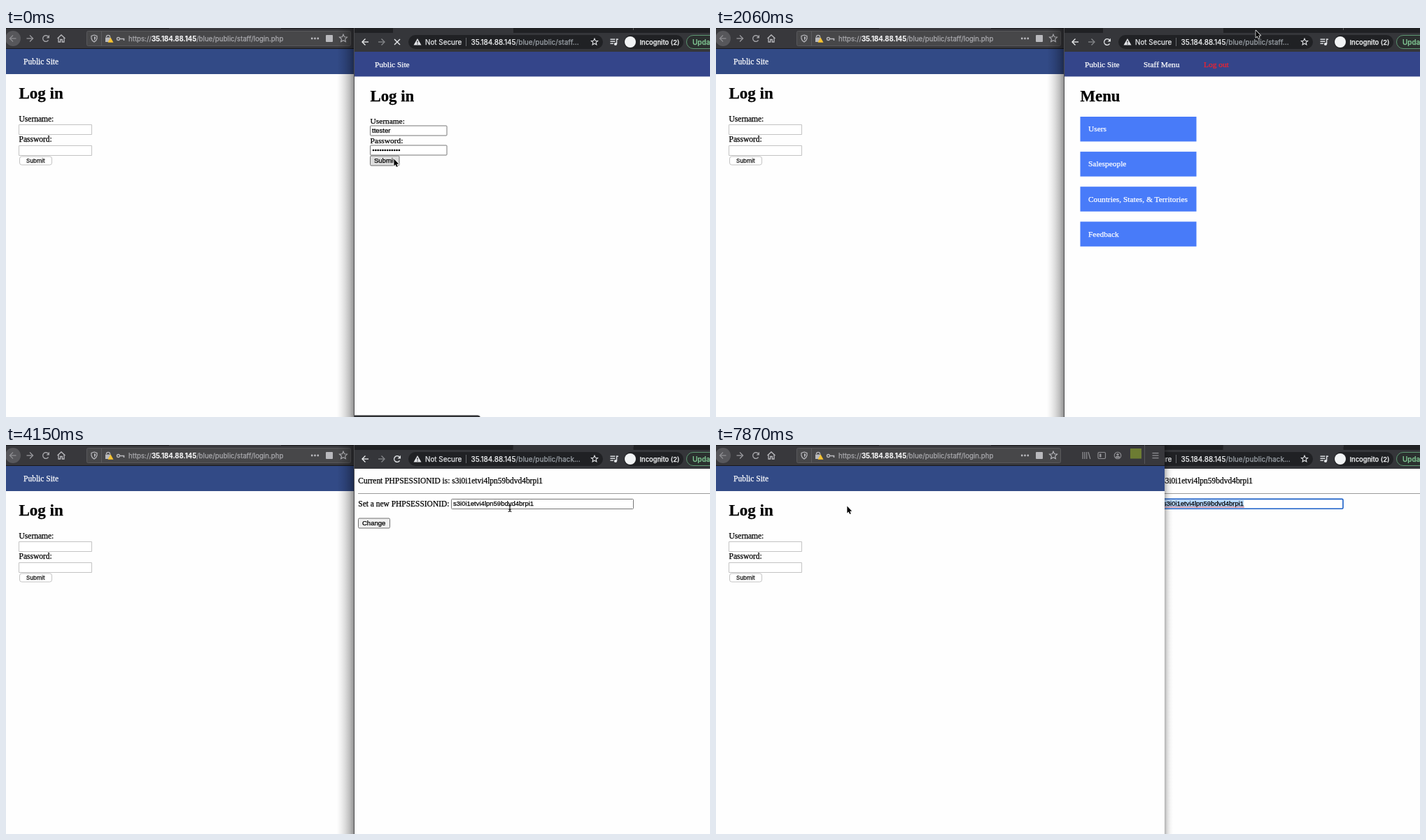
Write an HTML page with a canvas that moves like this. It is 1006x557 px and loops after 8000 ms.

```html
<!DOCTYPE html>
<html lang="en">
<head>
<meta charset="utf-8">
<title>Two browser windows</title>
<style>
  html, body { margin: 0; width: 100%; height: 100%; overflow: hidden; background: #fff; }
  canvas { display: block; width: 1006px; height: 557px; }
</style>
</head>
<body>
<canvas id="stage" width="1006" height="557"></canvas>
<script>
const ctx = document.getElementById('stage').getContext('2d');
const W = 1006, H = 557, LOOP = 8000;
const UI = 'Inter, "Open Sans", sans-serif';
const SERIF = '"Liberation Serif", "Noto Serif", serif';
const SANS = '"Liberation Sans", sans-serif';
const HOST = '35.184.88.145';
const SESSION = 's3i0i1etvi4lpn59bdvd4brpi1';

// When each change happens (ms)
const MENU = 440, SETTLED = 590, BUBBLE_END = 1030;
const CARD = 2960, CARD_FULL = 3110, HACK = 3260;
const FOCUS = 4590, SELECT = 5040, SPELL = 5190, RAISE = 7870;

// Pointer: time, x, y, shape
const POINTER = [
  [0, 554, 187, 'arrow'], [440, 620, 150, 'arrow'], [590, 734, 82, 'arrow'],
  [740, 767, 72, 'arrow'], [880, 758, 88, 'arrow'], [1030, 716, 112, 'arrow'],
  [1180, 668, 134, 'hand'], [1330, 641, 142, 'hand'], [1470, 697, 50, 'hand'],
  [1620, 718, 32, 'arrow'], [1770, 744, 17, 'arrow'], [1920, 763, 7, 'arrow'],
  [2060, 771, 3, 'arrow'], [3550, 752, 28, 'arrow'], [3700, 688, 56, 'arrow'],
  [3850, 625, 71, 'arrow'], [4000, 587, 78, 'arrow'], [4150, 720, 91, 'beam'],
  [4300, 752, 87, 'beam'], [4440, 760, 85, 'beam'], [5190, 715, 82, 'beam'],
  [5330, 675, 74, 'arrow'], [5480, 654, 70, 'arrow'], [5780, 650, 70, 'arrow'],
  [5930, 647, 69, 'arrow'], [7430, 247, 118, 'arrow'], [7570, 187, 87, 'arrow']
];

function rect(x, y, w, h, fill) {
  ctx.fillStyle = fill;
  ctx.fillRect(x, y, w, h);
}

function box(x, y, w, h, r, fill, edge, lw = 1) {
  ctx.beginPath();
  ctx.roundRect(x, y, w, h, r);
  if (fill) { ctx.fillStyle = fill; ctx.fill(); }
  if (edge) { ctx.strokeStyle = edge; ctx.lineWidth = lw; ctx.stroke(); }
}

function disc(x, y, r, fill) {
  ctx.fillStyle = fill;
  ctx.beginPath();
  ctx.arc(x, y, r, 0, Math.PI * 2);
  ctx.fill();
}

function ring(x, y, r, edge, from = 0, to = Math.PI * 2, lw = 1.3) {
  ctx.strokeStyle = edge;
  ctx.lineWidth = lw;
  ctx.beginPath();
  ctx.arc(x, y, r, from, to);
  ctx.stroke();
}

function trace(pts, x, y) {
  ctx.beginPath();
  for (let i = 0; i < pts.length; i += 2) ctx.lineTo(x + pts[i], y + pts[i + 1]);
}

function line(x, y, pts, color, lw = 1.3) {
  trace(pts, x, y);
  ctx.strokeStyle = color;
  ctx.lineWidth = lw;
  ctx.stroke();
}

function shape(x, y, pts, fill) {
  trace(pts, x, y);
  ctx.closePath();
  ctx.fillStyle = fill;
  ctx.fill();
}

// Draws text and returns the x where it ends; a hairline stroke mimics font smoothing
function text(str, x, y, size, color, family = SERIF, weight = 400) {
  ctx.font = `${weight} ${size}px ${family}`;
  ctx.fillStyle = ctx.strokeStyle = color;
  ctx.lineWidth = 0.25;
  ctx.fillText(str, x, y);
  ctx.strokeText(str, x, y);
  return x + ctx.measureText(str).width;
}

function shadow(x0, x1, stops) {
  const g = ctx.createLinearGradient(x0, 0, x1, 0);
  stops.forEach((a, i) => g.addColorStop(i / (stops.length - 1), `rgba(0,0,0,${a})`));
  rect(Math.min(x0, x1), 0, Math.abs(x1 - x0), H, g);
}

function navArrow(x, y, dir, color) {
  line(x, y, [-4.5 * dir, 0, 4.5 * dir, 0], color);
  line(x, y, [0, -4.5, 4.5 * dir, 0, 0, 4.5], color);
}

function reload(x, y, color) {
  ring(x, y, 4.3, color, 0.6, 5.5, 1.4);
  shape(x, y, [5, -5.2, 5, -0.6, 0.6, -0.6], color);
}

function star(x, y, r, color) {
  const pts = [];
  for (let i = 0; i < 10; i++) {
    const a = -Math.PI / 2 + i * Math.PI / 5, k = i % 2 ? r * 0.46 : r;
    pts.push(Math.cos(a) * k, Math.sin(a) * k);
  }
  trace(pts, x, y);
  ctx.closePath();
  ctx.strokeStyle = color;
  ctx.lineWidth = 1.1;
  ctx.stroke();
}

/* ---------- left window ---------- */

function leftToolbar(w) {
  const ink = '#b9b9bd', dim = '#929296';
  rect(0, 0, w, 30, '#38383c');
  rect(0, 0, w, 1, '#1b1b1e');
  rect(233, 0, 160, 1, '#3f3f43');
  rect(0, 29, w, 1, '#18181b');

  disc(10, 15, 11, '#57575b');
  navArrow(10, 15, -1, '#8d8d91');
  navArrow(34, 15, 1, '#9a9a9e');
  reload(57, 15, '#a2a2a6');
  line(79, 15, [-5.5, 0, 0, -5, 5.5, 0], ink);
  line(79, 15, [-4, -1, -4, 5, -1.3, 5, -1.3, 1.5, 1.3, 1.5, 1.3, 5, 4, 5, 4, -1], ink);

  box(115.5, 4.5, 377, 21, 2, '#474749', '#59595c');
  line(126, 15, [0, -5, 4, -3.6, 4, 0, 2.6, 3, 0, 5, -2.6, 3, -4, 0, -4, -3.6, 0, -5], ink, 1.2);
  shape(126, 15, [0, -3, 2, -2, 2, 0, 0, 3], ink);
  rect(136, 5, 1, 20, '#5b5b5f');
  ring(146, 13, 2.6, ink, Math.PI, 0);
  rect(142, 13.5, 8, 6.5, ink);
  shape(149.5, 17, [0, -3.5, 4, 3.8, -4, 3.8], '#f7c331');
  ring(160.5, 15.5, 2, ink);
  line(162.5, 15.5, [0, 0, 6, 0, 6, 2.4], ink, 1.6);

  let x = text('https://', 175, 19, 9.7, '#a9a9ad', UI);
  x = text(HOST, x, 19, 9.7, '#f9f9fa', UI, 600);
  text('/blue/public/staff/login.php', x, 19, 9.7, '#a9a9ad', UI);

  for (let i = -1; i < 2; i++) disc(441.5 + i * 4.3, 15, 1.4, ink);
  box(457, 10, 10, 10, 1, ink);
  star(482, 15, 5.8, ink);

  if (w < 600) return;
  for (let i = 0; i < 3; i++) rect(523.5 + i * 2.8, 10, 1.2, 10, dim);
  line(532, 10, [0, 0, 2.8, 10], dim, 1.2);
  box(546, 10.5, 10.5, 9, 1.5, null, dim, 1.2);
  rect(548, 12.5, 2.5, 5, dim);
  ring(574, 15, 4.8, dim, 0, 7, 1.1);
  disc(574, 13.7, 1.8, dim);
  box(571, 16, 6, 2.6, 1.3, dim);
  rect(592, 5, 16, 14.5, '#6d7c33');
  rect(612, 0, 1, 27, '#55555a');
  for (let i = -1; i < 2; i++) rect(623.5, 14.5 + i * 3.5, 9, 1.2, dim);
}

function leftWindow(w) {
  rect(0, 0, w, H, '#fefefe');
  leftToolbar(w);
  rect(0, 30, w, 36, '#324a86');
  text('Public Site', 25, 52, 11.5, '#fff');
  text('Log in', 18.5, 101, 23, '#000', SERIF, 700);
  text('Username:', 18.5, 134, 11.5, '#000');
  box(18.5, 138.5, 104, 14, 0, '#fff', '#c3c3c3');
  text('Password:', 18.5, 163, 11.5, '#000');
  box(18.5, 168.5, 104, 14, 0, '#fff', '#c3c3c3');
  box(19.5, 184, 46, 12, 3, '#fff', '#c4c4c4');
  text('Submit', 29, 193, 8.1, '#111', UI);
}

/* ---------- right window ---------- */

function tabStrip(active) {
  rect(498, 0, W - 498, 7, '#202124');
  rect(896, 0, 1, 3, '#5a5b5f');
  const x = active ? 724.5 : 553;
  box(x, -6, 172, 13, 0, '#35363a');
  box(x - 8, -6, 8, 12.5, [0, 0, 5, 0], '#202124');
  box(x + 172, -6, 8, 12.5, [0, 0, 0, 5], '#202124');
}

function rightToolbar(t) {
  const ink = '#e3e5e8';
  rect(498, 6.5, W - 498, 27.5, '#35363a');
  tabStrip(t >= HACK);
  navArrow(513.5, 20, -1, '#f1f3f4');
  navArrow(536.5, 20, 1, '#86888c');
  if (t < MENU) {
    line(559, 20, [-4, -4, 4, 4], ink, 1.4);
    line(559, 20, [4, -4, -4, 4], ink, 1.4);
  } else reload(559, 20, ink);

  box(575, 10, 278, 20, 10, '#202124');
  shape(588, 20, [0, -5, 5.5, 4.5, -5.5, 4.5], ink);
  rect(587.4, 18.2, 1.2, 3, '#202124');
  rect(587.4, 22.2, 1.2, 1.2, '#202124');
  text('Not Secure', 599, 23.6, 9.9, ink, UI);
  rect(657, 14, 1, 12, '#6a6c70');
  const x = text(HOST, 664.5, 23.6, 10.1, '#f1f3f4', UI);
  text(t < HACK ? '/blue/public/staff...' : '/blue/public/hack...', x, 23.6, 10.1, '#9aa0a6', UI);
  star(841, 20, 4.9, ink);

  for (let i = 0; i < 3; i++) rect(863.5, 15.5 + i * 3, i < 2 ? 7 : 4.5, 1.4, ink);
  rect(872, 15.5, 1.3, 7.5, ink);
  rect(872, 15.5, 3, 1.4, ink);
  disc(871, 23, 2.1, ink);

  box(883, 10, 85, 20, 10, '#202124');
  disc(892, 20, 8, '#f1f3f4');
  text('Incognito (2)', 905.5, 23.5, 9.35, '#f1f3f4', UI, 500);
  box(972.5, 10.5, 60, 19, 9.5, '#2b302f', '#5d9772');
  text('Update', 981, 23.6, 9.9, '#81c995', UI, 500);
}

function siteHeader() {
  rect(498, 34, W - 498, 35.5, '#34458a');
  text('Public Site', 527, 56, 11.4, '#fff');
}

function button(label, x, y, w, fill) {
  box(x + .5, y + .5, w, 14, 1.5, fill, '#6f6f6f');
  text(label, x + 6, y + 10.5, 9.5, '#000', SANS);
}

function loginPage() {
  siteHeader();
  text('Log in', 520.5, 105, 22.8, '#000', SERIF, 700);
  text('Username:', 520.5, 137, 11.4, '#000');
  box(520.5, 140, 109.5, 14, 1, '#fff', '#767676');
  text('ttester', 523, 150, 9.5, '#000', SANS);
  text('Password:', 520.5, 164.5, 11.4, '#000');
  box(520.5, 168, 109.5, 14, 1, '#fff', '#767676');
  for (let i = 0; i < 12; i++) disc(525 + i * 3.35, 175, 1.35, '#000');
  button('Submit', 520, 182.5, 41.5, '#dedede');
}

function menuPage(hover) {
  siteHeader();
  text('Staff Menu', 611, 56, 11.4, '#fff');
  text('Log out', 697, 56, 11.4, '#f5222d');
  text('Menu', 520.5, 105, 22.8, '#000', SERIF, 700);
  ['Users', 'Salespeople', 'Countries, States, & Territories', 'Feedback'].forEach((label, i) => {
    const y = 127 + i * 50.1;
    rect(520.5, y, 166, 35.5, hover && !i ? '#3e6edf' : '#487bf9');
    text(label, 532, y + 21.3, 11.4, '#fff');
  });
}

function hackPage(t) {
  text('Current PHPSESSIONID is: ' + SESSION, 503.3, 55, 11.46, '#000');
  rect(503, 69, W - 503, 1, '#9a9a9a');
  text('Set a new PHPSESSIONID:', 503.3, 87.5, 11.46, '#000');
  if (t >= FOCUS) box(637, 77.4, 259, 13.8, 1.5, '#fff', '#1a5fc8', 1.6);
  else box(636.5, 77.5, 260, 14, 1, '#fff', '#767676');
  ctx.font = `400 9.5px ${SANS}`;
  const w = ctx.measureText(SESSION).width;
  if (t >= SELECT) rect(639, 79, w, 10.5, '#b3d6fc');
  text(SESSION, 639, 87.2, 9.5, '#000', SANS);
  if (t >= FOCUS && t < SELECT) rect(639.5 + w, 79.5, 1, 9.5, '#000');
  if (t >= SPELL) for (let x = 639; x < 639 + w; x += 2.2) rect(x, 88.3, 1.3, 1.2, '#e23b3b');
  button('Change', 503, 104.5, 45, '#efefef');
}

function hoverCard(alpha) {
  ctx.save();
  ctx.globalAlpha = alpha;
  ctx.shadowColor = 'rgba(0,0,0,.45)';
  ctx.shadowBlur = 5;
  box(718.5, 8, 184, 42, 4, '#292a2d', '#3c3d41');
  ctx.restore();
  text('Change PHPSESSIONID', 731.5, 24.3, 9.3, '#d6d8db', UI, 600);
  text(HOST, 731.5, 38.7, 9.4, '#a3a7ac', UI);
}

function rightWindow(t) {
  rect(497, 0, W - 497, H, '#fefefe');
  rect(497, 0, 1, H, '#4b4b4d');
  rightToolbar(t);
  if (t < MENU) loginPage();
  else if (t < HACK) menuPage(t >= 1180 && t < 1470);
  else hackPage(t);
  if (t < BUBBLE_END) box(498, 554.5, t < SETTLED ? 180 : 234, 8, [0, 4, 0, 0], '#303134');
  if (t >= CARD && t < HACK) hoverCard(t < CARD_FULL ? 0.88 : 0.97);
}

/* ---------- pointer ---------- */

const ARROW = [0, 0, 0, 10, 2.2, 7.9, 3.8, 11.4, 5.3, 10.7, 3.9, 7.2, 6.8, 7.1];
const HAND = [1.2, 1, 2.6, 1, 3.6, 5, 5, 4.2, 6.2, 5, 7.4, 4.8, 8.6, 6, 8, 10, 7, 12, 3, 12, 0.6, 8.6, -1.2, 6.6, 0, 5.6, 2, 7];

function solidPointer(pts, x, y, fill, edge) {
  trace(pts, x, y);
  ctx.closePath();
  ctx.lineJoin = 'round';
  ctx.strokeStyle = edge;
  ctx.lineWidth = 1.4;
  ctx.stroke();
  ctx.fillStyle = fill;
  ctx.fill();
  ctx.lineJoin = 'miter';
}

function pointer(t) {
  const [, x, y, kind] = POINTER.findLast(p => p[0] <= t);
  if (kind === 'arrow') solidPointer(ARROW, x + 0.4, y + 0.6, '#000', '#fff');
  else if (kind === 'hand') {
    solidPointer(HAND, x, y, '#fff', '#111');
    for (let i = 0; i < 3; i++) line(x + 3.2 + i * 1.6, y, [0, 7.5, 0, 10], '#333', 0.6);
  } else {
    line(x, y, [0, -4, 0, 4], '#111', 1.2);
    for (const s of [-1, 1]) line(x, y, [-2.4, 4.6 * s, 0, 3.8 * s, 2.4, 4.6 * s], '#111', 1.1);
    line(x, y, [-1.6, 1.6, 1.6, 1.6], '#111', 1);
  }
}

function draw(t) {
  if (t < RAISE) {
    leftWindow(497);
    shadow(473, 497, [0, 0.06, 0.14, 0.25, 0.42]);
    rightWindow(t);
  } else {
    rightWindow(t);
    shadow(653, 641, [0, 0.04, 0.13, 0.3]);
    leftWindow(641);
  }
  pointer(t);
}

const start = performance.now();
function tick() {
  draw((performance.now() - start) % LOOP);
  requestAnimationFrame(tick);
}
tick();
</script>
</body>
</html>
```
